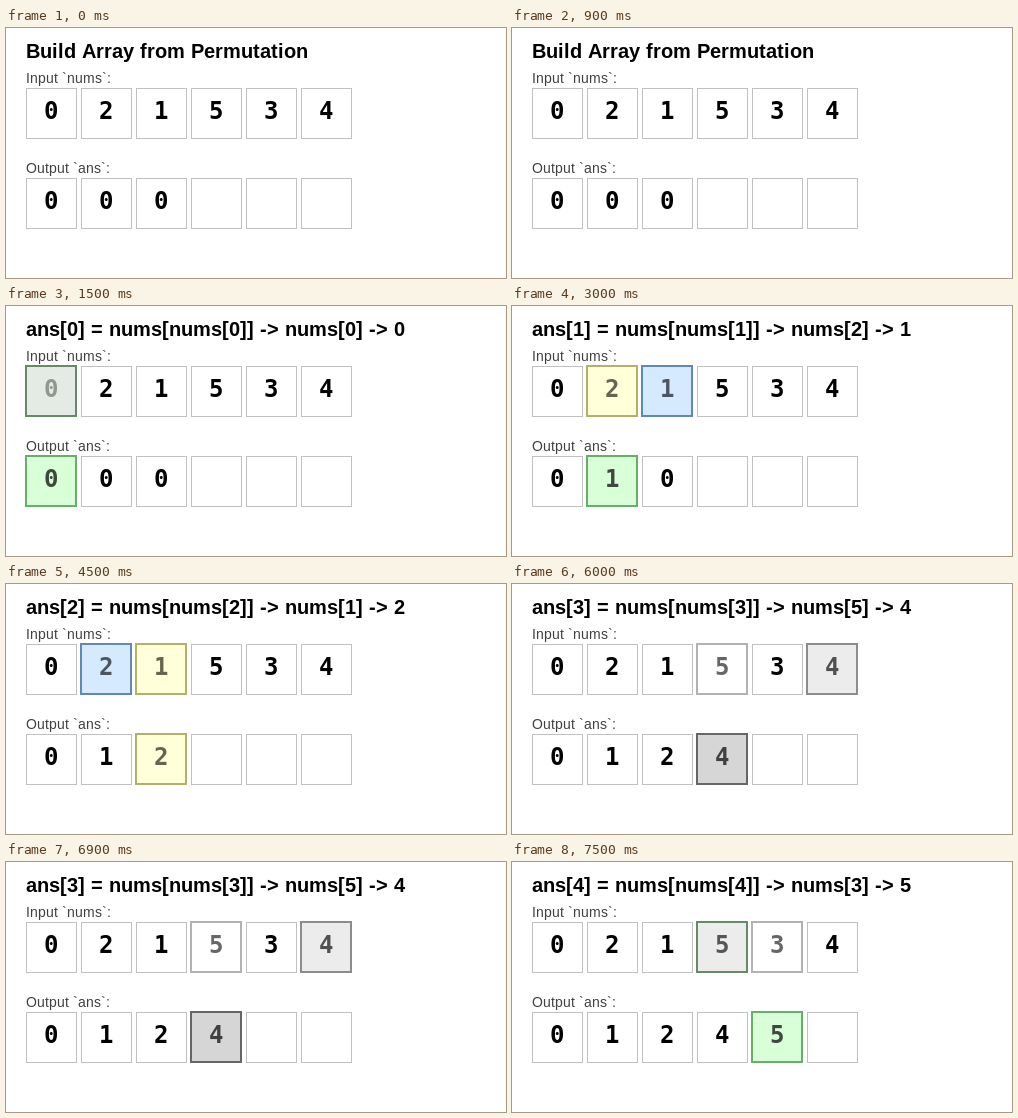
Animation, 500 px wide and 250 px high, one loop 8000 ms. Source, as an HTML page:

```html
<!DOCTYPE html>
<html lang="en">
<head>
<meta charset="utf-8">
<title>Build Array from Permutation</title>
<style>
  html, body { margin: 0; width: 100%; height: 100%; overflow: hidden; background: #fff; }
  svg { display: block; }
  text { white-space: pre; font-kerning: none; }
  rect { shape-rendering: crispEdges; }
  .title { font: bold 20px "Liberation Sans", Arial, sans-serif; }
  .label { font: 14px "Liberation Sans", Arial, sans-serif; fill: #404040; }
  .digit { font: bold 24px "DejaVu Sans Mono", monospace; }
</style>
</head>
<body>
<svg id="stage" width="500" height="250" viewBox="0 0 500 250"></svg>
<script>
const LOOP = 8000, STEP = 1500;
const LEFT = 20, SIZE = 50, PITCH = 55, INPUT_Y = 60, OUTPUT_Y = 150;
const nums = [0, 2, 1, 5, 3, 4];

// Highlight styles: [fill, border, digit]
const both = ['#e4ebe4', '#668a66', '#8f998f'];
const green = ['#d9ffd9', '#66b066', '#3c493c'];
const yellow = ['#ffffd9', '#b2b266', '#666650'];
const blue = ['#d6eaff', '#5f88b4', '#4d5560'];
const white = ['#ffffff', '#b2b2b2', '#666666'];
const pale = ['#ececec', '#8c8c8c', '#505050'];
const mossy = ['#ececec', '#668a66', '#555555'];
const gray = ['#d6d6d6', '#666666', '#404040'];

// Per step: highlight at i, at nums[i], and at the written output cell
const steps = [
  null,
  { at: both, via: both, out: green },
  { at: yellow, via: blue, out: green },
  { at: yellow, via: blue, out: yellow },
  { at: white, via: pale, out: gray },
  { at: white, via: mossy, out: green },
];

const stage = document.getElementById('stage');
const pen = document.createElement('canvas').getContext('2d');
const fonts = {
  title: 'bold 20px "Liberation Sans", Arial, sans-serif',
  label: '14px "Liberation Sans", Arial, sans-serif',
};

function add(parent, tag, attrs = {}, content = '') {
  const node = document.createElementNS('http://www.w3.org/2000/svg', tag);
  for (const name in attrs) node.setAttribute(name, attrs[name]);
  node.textContent = content;
  return parent.appendChild(node);
}

// Glyph advances snap to whole pixels.
function addLine(parent, kind, y, content) {
  pen.font = fonts[kind];
  let x = LEFT;
  const xs = [...content].map(char => {
    const start = x;
    x += Math.round(pen.measureText(char).width);
    return start;
  });
  add(parent, 'text', { class: kind, x: xs.join(' '), y }, content);
}

function addCell(parent, index, y, value, mark) {
  const x = LEFT + index * PITCH;
  const [fill, stroke, ink] = mark || ['#ffffff', '#c0c0c0', '#000000'];
  const shift = mark ? 0 : 0.5;
  add(parent, 'rect', {
    x: x + shift, y: y + shift, width: SIZE, height: SIZE,
    fill, stroke, 'stroke-width': mark ? 2 : 1,
  });
  add(parent, 'text', { class: 'digit', x: x + 18, y: y + 31, fill: ink }, value);
}

function buildScene(marks, step) {
  const scene = add(stage, 'g', { visibility: 'hidden' });
  const i = step - 1;
  const via = nums[i];
  addLine(scene, 'title', 30, marks
    ? `ans[${i}] = nums[nums[${i}]] -> nums[${via}] -> ${nums[via]}`
    : 'Build Array from Permutation');
  addLine(scene, 'label', 55, 'Input `nums`:');
  addLine(scene, 'label', 145, 'Output `ans`:');
  nums.forEach((value, j) => {
    const mark = marks && (j === i ? marks.at : j === via ? marks.via : null);
    const result = j <= i ? nums[value] : j < 3 ? 0 : '';
    addCell(scene, j, INPUT_Y, value, mark);
    addCell(scene, j, OUTPUT_Y, result, marks && j === i ? marks.out : null);
  });
  return scene;
}

const scenes = steps.map(buildScene);
let shown = -1;

function tick() {
  const current = Math.floor(performance.now() % LOOP / STEP);
  if (current !== shown) {
    scenes.forEach((scene, k) =>
      scene.setAttribute('visibility', k === current ? 'visible' : 'hidden'));
    shown = current;
  }
  requestAnimationFrame(tick);
}
tick();
</script>
</body>
</html>
```
